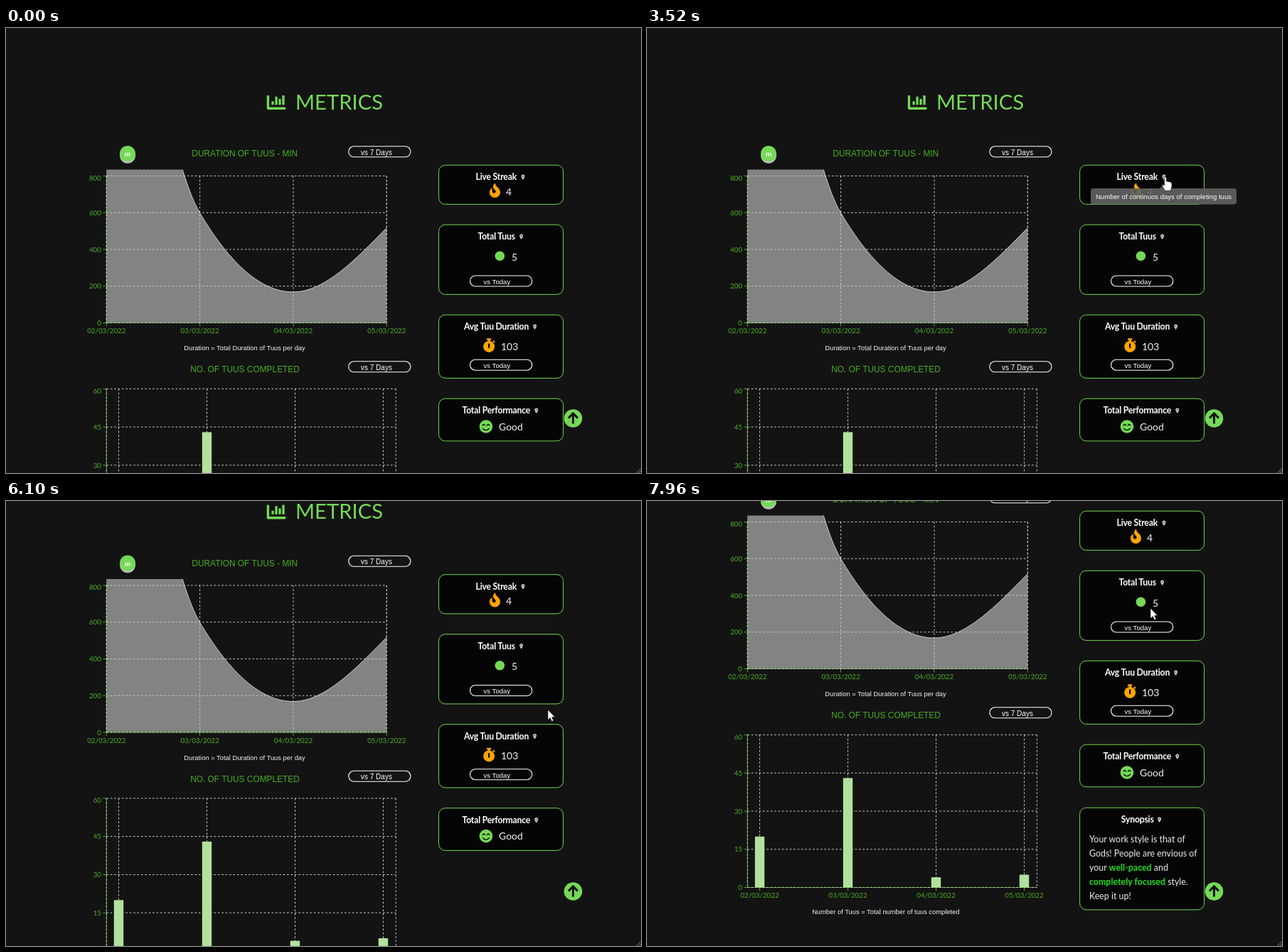
Recreate the animation shown at these times as an HTML page. Size 893x627 px, loop 8000 ms.

```html
<!DOCTYPE html>
<html lang="en">
<head>
<meta charset="utf-8">
<title>Metrics</title>
<style>
html, body { margin: 0; width: 100%; height: 100%; overflow: hidden; background: #131313; }
svg { display: block; width: 893px; height: 627px; }
text { font-family: "Liberation Sans", Arial, sans-serif; white-space: pre; }
.lato { font-family: Lato, sans-serif; }
.mid { text-anchor: middle; }
.end { text-anchor: end; }
.tick { font: 400 9.8px Lato, sans-serif; fill: #4cb022; }
.title { font-size: 11.9px; fill: #44ae1f; }
.note { font-size: 9.35px; fill: #f4f4f4; }
.head { font: 700 12.3px Lato, sans-serif; letter-spacing: -.25px; fill: #fff; }
.value { font: 400 14px Lato, sans-serif; fill: #f2f2f2; }
.body { font: 400 12.4px Lato, sans-serif; fill: #ececec; }
.body tspan { font-weight: 700; fill: #1fe01f; }
.card { fill: #050505; stroke: #74d752; }
.pill { fill: none; stroke: #fff; stroke-width: 1.1; }
.grid { stroke: #c9c9c9; stroke-dasharray: 2.7 2.7; fill: none; }
.axis { stroke: #46a822; fill: none; }
g { transform-origin: 0 0; }
#tip { transform-origin: 727px 222px; }
</style>
</head>
<body>
<svg viewBox="0 0 893 627">
  <g id="page">
    <g fill="#75d957">
      <path transform="translate(366.8 91.7) scale(.0518)" d="M496 384H64V80q0-16-16-16H16Q0 64 0 80v336q0 32 32 32h464q16 0 16-16v-32q0-16-16-16z
        M128 224h64v96h-64zM224 96h64v224h-64zM320 160h64v160h-64zM416 64h64v256h-64z"/>
      <text class="lato" x="407" y="114.8" font-size="29.2">METRICS</text>
    </g>
    <circle cx="171" cy="179.7" r="11" fill="#b9beb7"/>
    <circle cx="171" cy="177" r="11" fill="#75d957"/>
    <text class="mid" x="171" y="181.3" font-size="9.5" font-weight="700" fill="#fff">m</text>
    <g id="charts"></g>
    <g id="cards"></g>
    <path transform="translate(680 219) scale(.039)" fill="#ffa500" d="M216 24c0-24-31-33-44-13C48 192 224 200 224 288c0 36-29 64-65 64-35 0-63-30-63-65v-85c0-22-26-33-41-17C28 213 0 261 0 320c0 106 86 192 192 192s192-86 192-192c0-170-168-193-168-296z"/>
    <circle cx="694.4" cy="321.2" r="6.8" fill="#75d957"/>
    <g fill="#ffa500">
      <circle cx="679.2" cy="448.9" r="8"/>
      <path d="M676.2 437.3h6v2.5h-1.4v2h-3.2v-2h-1.4zM684.2 441.8l1.6-1.6 2 2-1.6 1.6z"/>
      <path d="M679.2 445.4v4.8" stroke="#050505" stroke-width="2.2" stroke-linecap="round"/>
    </g>
    <circle cx="675" cy="561.5" r="9.3" fill="#75d957"/>
    <path d="M670 560q1.8-3 3.6 0M676.4 560q1.8-3 3.6 0M670.6 564.2q4.4 4.8 8.8 0" fill="none" stroke="#050505" stroke-width="1.3" stroke-linecap="round"/>
    <g id="synopsis"></g>
  </g>
  <circle cx="797.5" cy="550" r="12.8" fill="#75d957"/>
  <path d="M797.5 557.5v-14M791 549.6l6.5-6.6 6.5 6.6" fill="none" stroke="#131313" stroke-width="3"/>
  <path d="M886.5 627l6.5-6.5M890 627l3-3" stroke="#8a8a8a"/>
  <g id="tip">
    <g fill="#616161" opacity=".92">
      <path d="M721 226l6-5 6 5z"/>
      <rect x="624" y="226" width="205" height="22.5" rx="3.5"/>
    </g>
    <text class="mid" x="726.5" y="241" font-size="9.55" fill="#fff">Number of continuos days of completing tuus</text>
  </g>
  <g id="cursor" fill="#fff">
    <path id="arrow" d="M0 0V14.5L3.3 11.5 5.5 16.6 7.9 15.5 5.7 10.6H10z" stroke="#000" stroke-width=".6"/>
    <path id="beam" d="M-3-6.5h2q1 0 1 1 0-1 1-1h2M0-5.5V5.5M-3 6.5h2q1 0 1-1 0 1 1 1h2" fill="none" stroke="#e6e6e6"/>
    <path id="hand" d="M-1.5 1.5a1.5 1.5 0 0 1 3 0V6l5.6 1.1q1.9.6 1.9 2.4v4l-1.6 5.8H-.6L-4 13.2q-1-2 .6-2.7l1.9 1.5z" stroke="#000" stroke-width=".6"/>
  </g>
</svg>
<script>
const $ = id => document.getElementById(id);
const LOOP = 8000, DAYS = ['02/03/2022', '03/03/2022', '04/03/2022', '05/03/2022'];
const text = (cls, x, y, s) => `<text class="${cls}" x="${x}" y="${y}">${s}</text>`;
const path = (cls, d) => `<path class="${cls}" d="${d}"/>`;
const pill = (x, y, tx, label, size) =>
  `<rect class="pill" x="${x}" y="${y}" width="87.2" height="15" rx="7.5"/>
   <text x="${tx}" y="${y + 11.8}" font-size="${size}" fill="#fff">${label}</text>`;

function frame({ left, right, top, bottom, cols, max }) {
  let grid = '', axis = `M${left} ${top}V${bottom}H${right}`, labels = '';
  for (let i = 0; i <= 4; i++) {
    const y = bottom - (bottom - top) * i / 4;
    grid += `M${left} ${y}H${right}`;
    axis += `M${left - 5} ${y}h5`;
    labels += text('tick end', 134, y + (i === 4 ? 6.5 : 3.7), max * i / 4);
  }
  cols.forEach((x, i) => {
    grid += `M${x} ${top}V${bottom}`;
    axis += `M${x} ${bottom}v5`;
    labels += text('tick mid', x, bottom + 14.5, DAYS[i]);
  });
  grid += `M${left} ${top}V${bottom}M${right} ${top}V${bottom}`;
  return path('axis', axis) + path('grid', grid) + labels;
}

const curve = 'M141.3-371.5C185.1-92.5 228.8 186.5 272.6 260.5C316.4 334.5 360.3 372 404 372S491.5 326.5 535.3 281.5';
const bars = { left: 141.3, right: 548.3, top: 508.4, bottom: 723.5, cols: [158.5, 282.5, 406.5, 530.5], max: 60 };
$('charts').innerHTML =
  `<clipPath id="plot"><rect x="141" y="199.5" width="395" height="216.5"/></clipPath>
   <g clip-path="url(#plot)"><path d="${curve}V415.5H141z" fill="#828383"/>
   <path d="${curve}" fill="none" stroke="#c9c9c9"/></g>` +
  frame({ left: 141.3, right: 535.3, top: 208.4, bottom: 415.5, cols: [141.3, 272.6, 404, 535.3], max: 800 }) +
  text('title mid', 335.8, 181.4, 'DURATION OF TUUS - MIN') +
  text('note mid', 335.5, 454.3, 'Duration = Total Duration of Tuus per day') +
  pill(481.8, 166.8, 499, 'vs 7 Days', 10) +
  frame(bars) +
  [20, 43, 4, 5].map((v, i) => {
    const h = v * 215 / 60;
    return `<rect x="${bars.cols[i] - 6.7}" y="${bars.bottom - h}" width="13.4" height="${h}" fill="#b1e29d"/>`;
  }).join('') +
  text('title mid', 336, 485.2, 'NO. OF TUUS COMPLETED') +
  text('note mid', 335.8, 761.4, 'Number of Tuus = Total number of tuus completed') +
  pill(481.8, 469.8, 499, 'vs 7 Days', 10);

const card = (y, h, title, x, pin, ty = y + 21) =>
  `<rect class="card" x="608.6" y="${y}" width="175" height="${h}" rx="9"/>` +
  text('head', x, ty, title) +
  `<path transform="translate(${pin} ${ty - 4})" fill="#ccc" d="M0 3.7Q-2.5.5-2.5-1.1a2.5 2.5 0 0 1 5 0Q2.5.5 0 3.7z"/>
   <circle cx="${pin}" cy="${ty - 5.1}" r=".9" fill="#333"/>`;

$('cards').innerHTML =
  card(193.2, 55.2, 'Live Streak', 660.5, 727) + text('value', 703, 235.5, '4') +
  card(277.2, 98.2, 'Total Tuus', 663.5, 724.6) + text('value', 711, 327.5, '5') +
  pill(652.6, 349, 671.5, 'vs Today', 9.6) +
  card(404.2, 89.2, 'Avg Tuu Duration', 644, 743.6) + text('value', 696, 453.8, '103') +
  pill(652.6, 467.2, 671.5, 'vs Today', 9.6) +
  card(522.2, 59.7, 'Total Performance', 641.5, 745.8) + text('value', 693, 566.7, 'Good');

$('synopsis').innerHTML = card(611.2, 143.7, 'Synopsis', 666.8, 720.6) + [
  'Your work style is that of',
  'Gods! People are envious of',
  'your <tspan>well-paced</tspan> and',
  '<tspan>completely focused</tspan> style.',
  'Keep it up!'
].map((s, i) => text('body', 622, 660 + i * 20.1, s)).join('');

// Each step: [ms, value, easing towards the next step]
function play(id, prop, steps) {
  const all = [[0, steps[0][1]], ...steps, [LOOP, steps.at(-1)[1]]];
  $(id).animate(all.map(([ms, v, easing = 'linear']) => ({ offset: ms / LOOP, [prop]: v, easing })),
    { duration: LOOP, iterations: Infinity });
}
const move = (x, y) => `translate(${x}px, ${y}px)`;
const show = (id, ...flips) =>
  play(id, 'opacity', flips.map(([ms, on]) => [ms, on, 'steps(1, end)']));

play('page', 'transform', [
  [5920, move(0, 0), 'ease-in-out'], [6090, move(0, -89.5)],
  [6205, move(0, -89.5), 'ease-in-out'], [6380, move(0, -179)]
]);
play('synopsis', 'transform', [[6390, move(0, 89.5), 'ease'], [7090, move(0, 0)]]);
play('synopsis', 'opacity', [[6390, 0, 'ease'], [7090, 1]]);
play('tip', 'opacity', [[3345, 0, 'ease-out'], [3515, 1], [5375, 1, 'ease-in'], [5540, 0]]);
play('tip', 'transform', [
  [3345, 'scale(.75, .56)', 'ease-out'], [3515, 'scale(1)'],
  [5375, 'scale(1)', 'ease-in'], [5540, 'scale(.75, .56)']
]);
play('cursor', 'transform', [
  [60, move(848, 632), 'ease-out'], [870, move(717, 225)],
  [900, move(717, 224), 'ease-in-out'], [1380, move(711, 212)],
  [1640, move(711, 212)], [1770, move(712, 228)],
  [2000, move(712, 228)], [2130, move(714, 216)], [2310, move(692, 226)],
  [2590, move(692, 226), 'ease-in'], [2850, move(738, 204), 'ease-out'], [3200, move(729, 210)],
  [5320, move(729, 210)], [5350, move(734, 221), 'ease-out'], [5670, move(762, 294)],
  [6730, move(762, 294), 'ease-in-out'], [7470, move(700, 111)],
  [7860, move(700, 111)], [7955, move(708, 151)]
]);
show('arrow', [0, 1], [1150, 0], [1690, 1], [3080, 0], [5340, 1]);
show('beam', [0, 0], [1150, 1], [1690, 0]);
show('hand', [0, 0], [3080, 1], [5340, 0]);
</script>
</body>
</html>
```
